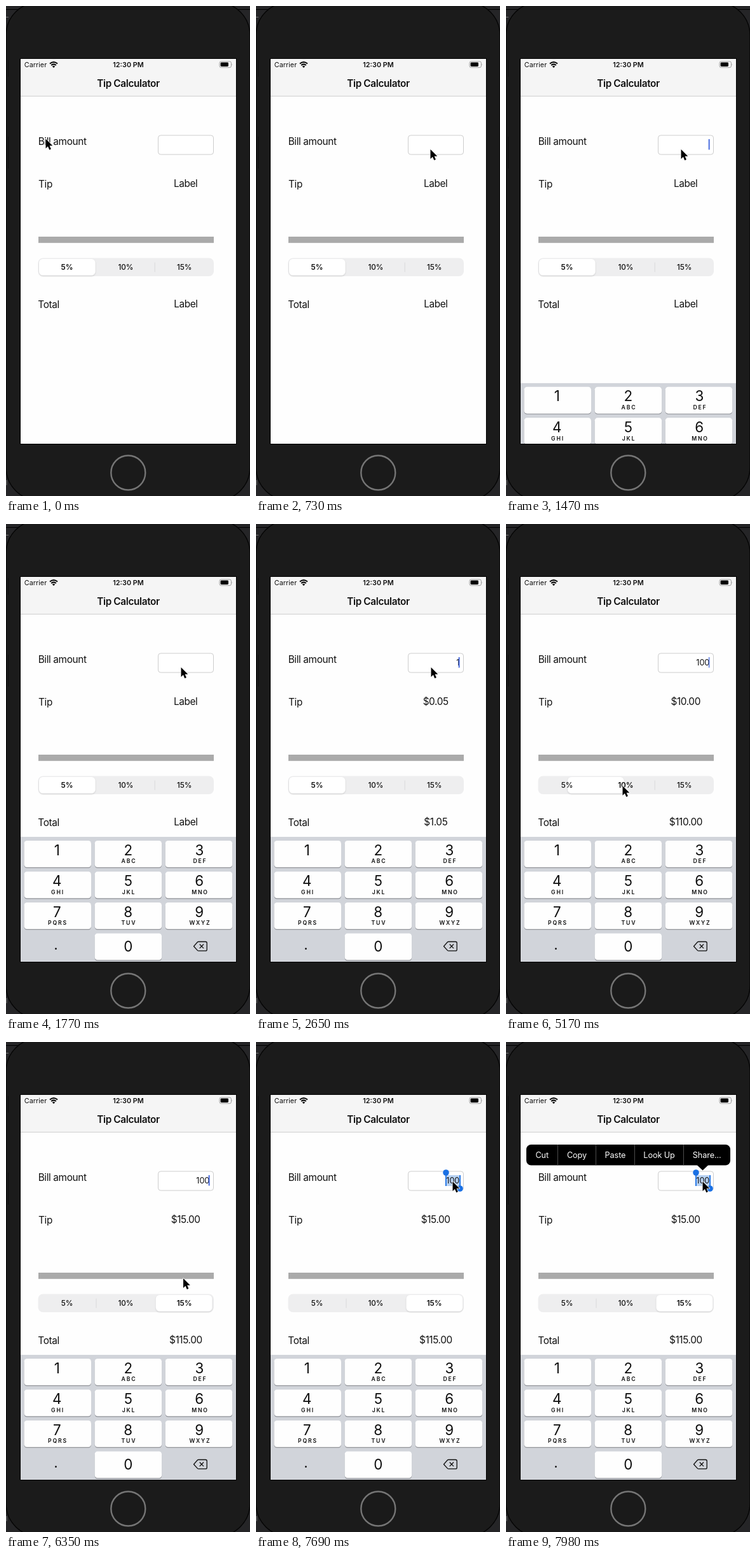
These frames come from a looping animation (384x769 px, 8000 ms). An HTML page:

```html
<!DOCTYPE html>
<html lang="en">
<head>
<meta charset="utf-8">
<title>Tip Calculator</title>
<style>
  html, body { margin: 0; width: 100%; height: 100%; overflow: hidden; background: #252527; }
  svg { display: block; width: 100%; height: 100%; }
  text { font: 15.37px Inter, Roboto, sans-serif; letter-spacing: -.37px; fill: #111; white-space: pre; }
  .mid { text-anchor: middle; }
  .end { text-anchor: end; }
  .status { font-size: 10.85px; letter-spacing: 0; }
  .bold { font-weight: 600; }
  .bill { font-size: 12.66px; letter-spacing: -.1px; }
  .seg { font-size: 11.75px; font-weight: 500; letter-spacing: -.1px; }
  .digit { font-size: 22.4px; letter-spacing: 0; }
  .letters { font-size: 8.7px; font-weight: 600; letter-spacing: 1.8px; }
  .item { font-size: 12.66px; letter-spacing: -.1px; fill: #fff; }
</style>
</head>
<body>
<svg viewBox="0 0 384 769" preserveAspectRatio="none">
  <defs>
    <clipPath id="screen"><rect x="23" y="83" width="339" height="604"/></clipPath>
    <filter id="soft" x="-10%" y="-20%" width="120%" height="150%">
      <feDropShadow dx="0" dy="1.2" stdDeviation="1.2" flood-opacity=".16"/>
    </filter>
  </defs>

  <!-- phone -->
  <rect width="384" height="769" fill="#252527"/>
  <path d="M0 5.5H384" stroke="#000"/>
  <path d="M0 17.5H4M1 744V752" stroke="#777"/>
  <rect y="-6" width="384" height="782" rx="52" fill="#1b1b1b" stroke="#050505" stroke-width="1.5"/>
  <path d="M3.5 85V111M3.5 205V255" stroke="#111"/>
  <circle cx="192.3" cy="732.5" r="27" fill="#1a1a1a" stroke="#757575" stroke-width="2.4"/>
  <rect x="22" y="82" width="341" height="606" fill="#000"/>

  <g clip-path="url(#screen)">
    <rect x="23" y="83" width="339" height="604" fill="#fefefe"/>
    <rect x="23" y="83" width="339" height="58" fill="#f5f5f5"/>
    <path d="M23 141.5H362" stroke="#cfcfcf"/>

    <!-- status and title -->
    <text class="status" x="28.8" y="96">Carrier</text>
    <g fill="none" stroke="#000" stroke-width="2">
      <path d="M69 90.6Q75 85.4 81 90.6M71.2 93Q75 89.8 78.8 93"/>
      <path d="M75 97L72.8 94.7Q75 93 77.2 94.7Z" fill="#000" stroke="none"/>
    </g>
    <text class="status bold mid" x="192.5" y="96">12:30 PM</text>
    <rect x="336" y="87" width="18.5" height="9.6" rx="2.6" fill="none" stroke="#999" stroke-width=".9"/>
    <rect x="337.6" y="88.6" width="12.4" height="6.4" rx="1.4"/>
    <path d="M355.6 90.2Q357 91.8 355.6 93.4Z" fill="#999"/>
    <text class="bold mid" x="192.5" y="126.5">Tip Calculator</text>

    <!-- form -->
    <text x="50.7" y="217.5">Bill amount</text>
    <text x="51" y="284.5">Tip</text>
    <text x="50.3" y="473.5">Total</text>
    <text id="tip" class="mid" x="282.7" y="284"></text>
    <text id="total" class="mid" x="282.9" y="473"></text>
    <rect x="239.5" y="203" width="87" height="30" rx="4" fill="#fff" stroke="#cdcdcd"/>
    <rect id="marked" x="299" y="209" width="22" height="17" fill="#b8d2f2"/>
    <text id="bill" class="bill end" x="320.2" y="222"></text>
    <rect id="caret" x="318.7" y="209" width="1.9" height="16.5" fill="#4468de"/>
    <rect x="51" y="362" width="276" height="9.8" fill="#aaa"/>

    <rect x="50.5" y="395.5" width="276.5" height="28.5" rx="7.5" fill="#eeeeef"/>
    <path id="line0" d="M142 402.5V417.5" stroke="#d8d8da"/>
    <path id="line1" d="M234.2 402.5V417.5" stroke="#d8d8da"/>
    <rect id="thumb" y="397" width="88.5" height="25.8" rx="6" fill="#fff" filter="url(#soft)"/>
    <g id="segs"></g>

    <g id="keyboard">
      <rect x="23" y="491" width="339" height="200" fill="#d1d4da"/>
    </g>

    <!-- selection handles and edit menu -->
    <g id="handles" fill="#1a70e4">
      <path d="M298 205h1.8v21h-1.8zM320.2 209h1.8v21h-1.8z"/>
      <circle cx="299" cy="205" r="4.8"/>
      <circle cx="321" cy="230" r="4.8"/>
    </g>
    <g id="menu">
      <rect x="32" y="161" width="321" height="32.5" rx="7.5"/>
      <path d="M300.5 193H318.5L309.5 201.5Z"/>
    </g>
  </g>
  <path id="mouse" d="M0 0V15L3.4 11.8L5.8 17.2L8.4 16L6.1 10.8H10.8Z"
    stroke="#fff" stroke-width="1.4" stroke-linejoin="round" paint-order="stroke"/>
</svg>

<script>
const LOOP = 8000, STEP = 147.6;
const $ = id => document.getElementById(id);
const add = (id, html) => $(id).insertAdjacentHTML('beforeend', html);
const text = (cls, x, y, s) => `<text class="${cls} mid" x="${x}" y="${y}">${s}</text>`;

const rates = [5, 10, 15];
rates.forEach((r, i) => add('segs', text('seg', 96 + 92.3 * i, 414, r + '%')));

const edges = [32, 81.5, 141.5, 202.5, 279.5, 353];
['Cut', 'Copy', 'Paste', 'Look Up', 'Share...'].forEach((s, i) => {
  if (i) add('menu', `<path d="M${edges[i]} 161V193.5" stroke="#4c4c4c"/>`);
  add('menu', text('item', (edges[i] + edges[i + 1]) / 2, 182, s));
});

function key(col, row, digit, sub) {
  const x = 28.5 + 111.1 * col, y = 497 + 48.5 * row, mid = 80.3 + 112 * col;
  add('keyboard',
    `<rect x="${x}" y="${y + 1}" width="105.5" height="42" rx="4.5" fill="#909298"/>
     <rect x="${x}" y="${y}" width="105.5" height="41.8" rx="4.5" fill="#fefefe"/>` +
    text('digit', mid, y + (sub === undefined ? 28.5 : 22.5), digit) +
    text('letters', mid + 1.2, y + 35.2, sub || ''));
}
['', 'ABC', 'DEF', 'GHI', 'JKL', 'MNO', 'PQRS', 'TUV', 'WXYZ']
  .forEach((s, i) => key(i % 3, Math.floor(i / 3), i + 1, s));
key(1, 3, 0);
add('keyboard', text('digit', 78.5, 668, '.') +
  `<path d="M295.5 662.7L301.5 656Q302 655.5 303 655.5H314Q316.2 655.5 316.2 657.7V667.7Q316.2 669.9 314 669.9H303Q302 669.9 301.5 669.4ZM304.7 659.5L311 665.9M311 659.5L304.7 665.9"
    fill="none" stroke="#111" stroke-width="1.3" stroke-linejoin="round"/>`);

const clamp = v => Math.min(1, Math.max(0, v));
const ease = (k, start, span) => 1 - (1 - clamp((k - start) / span)) ** 3;
const set = (id, name, value) => $(id).setAttribute(name, value);
const money = v => '$' + v.toFixed(2);

// Each pointer move: start step, duration in steps, destination.
const home = [62.5, 208.5];
const moves = [[0, 6, 275.5, 225], [24, 8, 183.5, 411], [40, 3, 279, 371], [43, 3, 309.5, 219]];

function pointer(k) {
  return moves.reduce(([x, y], [start, span, toX, toY]) => {
    const f = ease(k, start, span);
    return [x + (toX - x) * f, y + (toY - y) * f];
  }, home);
}

function caret(k) {
  if (k < 10 || k >= 52) return 0;
  const typing = k >= 17 && k < 25;
  return typing ? 1 : clamp(.5 + 2 * Math.cos((k - 29.85) / 6.7 * 2 * Math.PI));
}

function draw(ms) {
  const k = Math.floor((ms + 16) / STEP);
  const bill = k < 17 ? 0 : k < 20 ? 1 : k < 21 ? 10 : 100;
  const pick = k < 35 ? 0 : k < 42 ? 1 : 2;
  const tip = bill * rates[pick] / 100;
  $('bill').textContent = bill || '';
  $('tip').textContent = bill ? money(tip) : 'Label';
  $('total').textContent = bill ? money(bill + tip) : 'Label';

  set('mouse', 'transform', `translate(${pointer(k)})`);
  set('caret', 'opacity', caret(k));
  set('thumb', 'x', 52 + 92.3 * (ease(k, 34.5, 2.5) + ease(k, 41, 2.5)));
  set('line0', 'opacity', k > 42 ? 1 : 0);
  set('line1', 'opacity', k < 36 ? 1 : 0);
  [...$('segs').children].forEach((s, i) => s.style.fontWeight = i === pick ? 600 : 500);

  set('keyboard', 'transform', `translate(0 ${197 * (1 - ease(k, 9.5, 2.5))})`);

  const marked = k >= 52 ? 1 : 0;
  set('marked', 'opacity', marked);
  set('handles', 'opacity', marked);
  set('menu', 'opacity', clamp((k - 52) / 2));
}

function loop(now) {
  draw(now % LOOP);
  requestAnimationFrame(loop);
}
draw(0);
requestAnimationFrame(loop);
</script>
</body>
</html>
```
